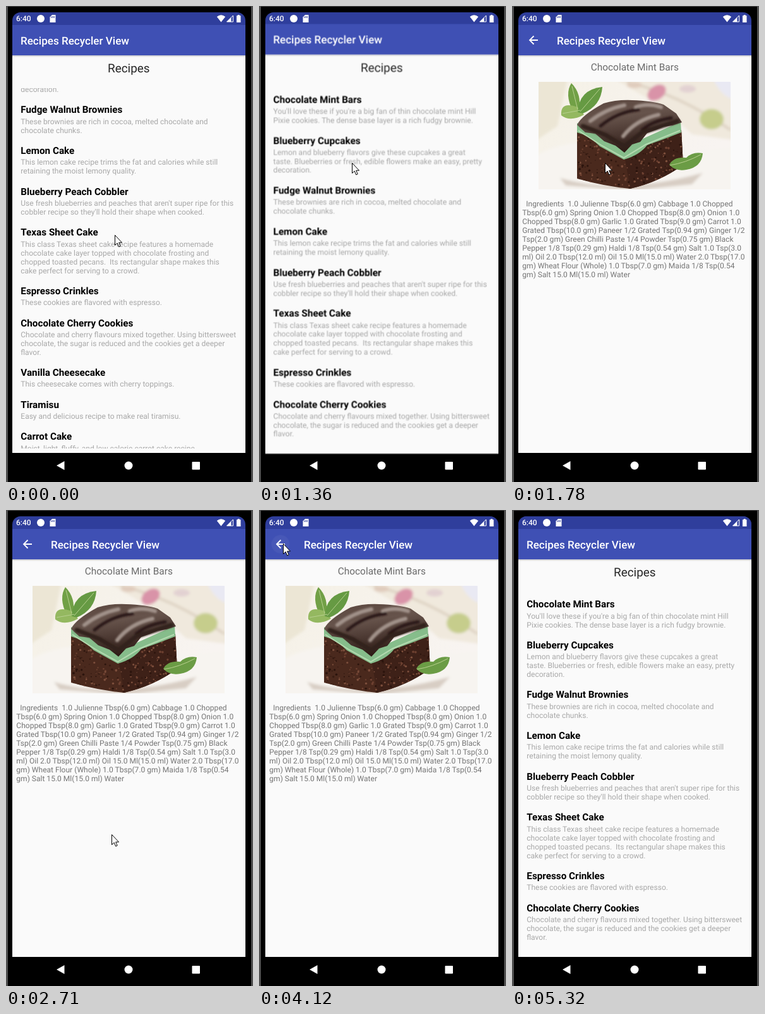
These frames come from a looping animation (391 px wide and 753 px high, 5.63 s). An HTML page:

```html
<!DOCTYPE html>
<html lang="en">
<head>
<meta charset="utf-8">
<title>Recipes</title>
<style>
  html, body { margin: 0; width: 100%; height: 100%; overflow: hidden; background: #000; }
  svg { display: block; width: 391px; height: 753px; }
  text { font-family: Roboto, sans-serif; white-space: pre; text-rendering: geometricPrecision; }
  .bar { font-size: 17.08px; font-weight: 500; fill: #fff; }
  .heading { font-size: 18.9px; fill: #262626; text-anchor: middle; }
  .name { font-size: 15.25px; font-weight: 700; fill: #000; }
  .about { font-size: 12.03px; fill: #a8a8a8; }
  .dish { font-size: 15.45px; fill: #6a6a6a; text-anchor: middle; }
  .ingredients { font-size: 12.06px; fill: #757575; }
  .clock { font-size: 12px; font-weight: 500; fill: #fff; }
</style>
</head>
<body>
<svg id="stage" viewBox="0 0 391 753" xmlns="http://www.w3.org/2000/svg"></svg>
<script>
const LOOP = 5630;
const LINE = 14.03;

const recipes = [
  ['Chocolate Mint Bars', "You'll love these if you're a big fan of thin chocolate mint Hill", 'Pixie cookies. The dense base layer is a rich fudgy brownie.'],
  ['Blueberry Cupcakes', 'Lemon and blueberry flavors give these cupcakes a great', 'taste. Blueberries or fresh, edible flowers make an easy, pretty', 'decoration.'],
  ['Fudge Walnut Brownies', 'These brownies are rich in cocoa, melted chocolate and', 'chocolate chunks.'],
  ['Lemon Cake', 'This lemon cake recipe trims the fat and calories while still', 'retaining the moist lemony quality.'],
  ['Blueberry Peach Cobbler', "Use fresh blueberries and peaches that aren't super ripe for this", "cobbler recipe so they'll hold their shape when cooked."],
  ['Texas Sheet Cake', 'This class Texas sheet cake recipe features a homemade', 'chocolate cake layer topped with chocolate frosting and', 'chopped toasted pecans.  Its rectangular shape makes this', 'cake perfect for serving to a crowd.'],
  ['Espresso Crinkles', 'These cookies are flavored with espresso.'],
  ['Chocolate Cherry Cookies', 'Chocolate and cherry flavours mixed together. Using bittersweet', 'chocolate, the sugar is reduced and the cookies get a deeper', 'flavor.'],
  ['Vanilla Cheesecake', 'This cheesecake comes with cherry toppings.'],
  ['Tiramisu', 'Easy and delicious recipe to make real tiramisu.'],
  ['Carrot Cake', 'Moist, light, fluffy, and low calorie carrot cake recipe.']
];

const ingredients = [
  '  Ingredients  1.0 Julienne Tbsp(6.0 gm) Cabbage 1.0 Chopped',
  'Tbsp(6.0 gm) Spring Onion 1.0 Chopped Tbsp(8.0 gm) Onion 1.0',
  'Chopped Tbsp(8.0 gm) Garlic 1.0 Grated Tbsp(9.0 gm) Carrot 1.0',
  'Grated Tbsp(10.0 gm) Paneer 1/2 Grated Tsp(0.94 gm) Ginger 1/2',
  'Tsp(2.0 gm) Green Chilli Paste 1/4 Powder Tsp(0.75 gm) Black',
  'Pepper 1/8 Tsp(0.29 gm) Haldi 1/8 Tsp(0.54 gm) Salt 1.0 Tsp(3.0',
  'ml) Oil 2.0 Tbsp(12.0 ml) Oil 15.0 Ml(15.0 ml) Water 2.0 Tbsp(17.0',
  'gm) Wheat Flour (Whole) 1.0 Tbsp(7.0 gm) Maida 1/8 Tsp(0.54',
  'gm) Salt 15.0 Ml(15.0 ml) Water'
];

const text = (kind, x, y, s) => `<text class="${kind}" x="${x}" y="${y.toFixed(2)}">${s}</text>`;

function rows() {
  let y = 154.2;
  return recipes.map(([name, ...lines]) => {
    const row = text('name', 23.3, y, name) +
      lines.map((s, i) => text('about', 23.3, y + 17.3 + i * LINE, s)).join('');
    y += 36.55 + lines.length * LINE;
    return row;
  }).join('');
}

const appWindow = (id, titleX, content) => `
  <g id="${id}">
    <rect x="10" y="10" width="369" height="760" fill="#000"/>
    <rect x="10" y="30" width="369" height="677" fill="#fafafa"/>
    <rect x="10" y="78" width="369" height="3" fill="url(#shadow)"/>
    <rect x="10" y="10" width="369" height="20.5" fill="#2f3e9c"/>
    <rect x="10" y="30" width="369" height="48" fill="#3f50b4"/>
    ${text('bar', titleX, 61, 'Recipes Recycler View')}
    ${content}
  </g>`;

const listWindow = id => appWindow(id, 23, `
  ${text('heading', 194.3, 105.2, 'Recipes')}
  <g clip-path="url(#listArea)"><g class="rows">${rows()}</g></g>`);

function crumbs(count) {
  let seed = 7;
  const random = () => (seed = seed * 16807 % 2147483647) / 2147483647;
  const tones = ['#2b140d', '#371c13', '#6d4030', '#7d4f3c'];
  return Array.from({ length: count }, () => {
    const x = 100 + random() * 172, y = 190 + random() * 102;
    return `<circle cx="${x.toFixed(1)}" cy="${y.toFixed(1)}" r="${(0.6 + random() * 1.3).toFixed(1)}" fill="${tones[Math.floor(random() * 4)]}"/>`;
  }).join('');
}

const CAKE = 'M103 194 178 236 268 196 271 251Q235 278 187 289 145 285 103 273Z';

const photo = `
  <g clip-path="url(#photoArea)">
    <rect x="42" y="120" width="304" height="170" fill="url(#table)"/>
    <g filter="url(#soft)">
      <path d="M36 114H88L72 190 36 214Z" fill="#ece6d5"/>
      <path d="M160 114H322L352 150V212L285 203 238 160Z" fill="#f0e9dd"/>
      <path d="M182 120Q265 140 346 196" fill="none" stroke="#ddd2c2" stroke-width="4"/>
      <path d="M318 114H352V148Q330 143 318 114Z" fill="#e9e9f3"/>
      <ellipse cx="229" cy="137" rx="16" ry="11" fill="#d993a8" transform="rotate(-35 229 137)"/>
      <ellipse cx="194" cy="125" rx="12" ry="5" fill="#e0ccbd"/>
      <ellipse cx="278" cy="131" rx="13" ry="6" fill="#e2d1d2"/>
      <ellipse cx="316" cy="179" rx="19" ry="16" fill="#c6cd8c"/>
      <path d="M36 238Q90 205 180 220T352 222V296H36Z" fill="#f7f4f0"/>
      <path d="M76 272Q170 300 302 264L285 282 190 292 85 284Z" fill="#d8cec4"/>
    </g>
    <path d="M96 166Q83 139 94 122 111 139 106 166Z" fill="#71a046"/>
    <path d="M78 173Q76 150 104 160L114 172Q92 184 78 173Z" fill="#94b860"/>
    <path d="M104 168Q106 132 143 128 141 158 112 170Z" fill="#669a43"/>
    <path d="M95 127 104 164M80 170 108 165M139 131 108 167" fill="none" stroke="#b8d090" stroke-width="1"/>
    <path d="${CAKE}" fill="#4a291d"/>
    <path d="M178 236 268 196 271 251Q235 278 187 289Z" fill="#3e2118"/>
    <g clip-path="url(#cakeArea)">${crumbs(420)}</g>
    <path d="M103 185 103 200Q123 205 139 222L177 243Q202 236 214 220 240 211 268 200L267 183 178 223Z" fill="#86bd8b"/>
    <path d="M105 197 141 220 177 240 212 219 266 197" fill="none" stroke="#b4dab0" stroke-width="2"/>
    <path d="M103 188Q110 173 145 154 165 148 190 149 222 150 240 156L260 170 269 184 254 189 240 191 228 196 214 201 203 215 190 219 178 232 164 221 146 214 132 202 116 200Z" fill="url(#frosting)"/>
    <g clip-path="url(#photoArea)" fill="none" stroke-linecap="round" filter="url(#gloss)">
      <path d="M124 182Q148 163 178 157M196 160Q214 153 236 160M176 206Q196 180 232 172" stroke="#a1928a" stroke-width="6"/>
      <path d="M140 190Q166 168 200 164M206 196Q222 182 252 177" stroke="#2a1814" stroke-width="5"/>
      <path d="M112 190 148 204 178 222 206 200 262 182" stroke="#33201a" stroke-width="7"/>
    </g>
    <path d="M249 251Q256 238 276 240 286 230 302 233 300 255 276 259 258 262 249 251Z" fill="#6b9c45"/>
    <path d="M250 252Q275 248 299 235" fill="none" stroke="#b9d08f"/>
  </g>`;

const detailWindow = appWindow('detail', 71, `
  <circle id="ripple" r="18" fill="#fff"/>
  <path d="M41 54H28.500M34.500 47.500 28 54 34.500 60.500" fill="none" stroke="#fff" stroke-width="1.8"/>
  ${text('dish', 194.3, 101.5, 'Chocolate Mint Bars')}
  ${photo}
  ${ingredients.map((s, i) => text('ingredients', 16.3, 316.8 + i * LINE, s)).join('')}`);

document.getElementById('stage').innerHTML = `
  <defs>
    <clipPath id="screen"><rect x="10" y="10" width="369" height="760" rx="13"/></clipPath>
    <clipPath id="listArea"><rect x="10" y="130" width="369" height="570"/></clipPath>
    <clipPath id="photoArea"><rect x="42" y="120" width="304" height="170"/></clipPath>
    <clipPath id="cakeArea"><path d="${CAKE}"/></clipPath>
    <filter id="soft"><feGaussianBlur stdDeviation="2"/></filter>
    <filter id="gloss"><feGaussianBlur stdDeviation="1.6"/></filter>
    <linearGradient id="shadow" x2="0" y2="1">
      <stop stop-color="#c4c4c8"/><stop offset="1" stop-color="#fafafa"/>
    </linearGradient>
    <linearGradient id="table" x2="1" y2=".4">
      <stop stop-color="#f5f1e6"/><stop offset="1" stop-color="#f8f4f1"/>
    </linearGradient>
    <linearGradient id="frosting" x2=".3" y2="1">
      <stop stop-color="#5b473f"/><stop offset=".4" stop-color="#66534b"/><stop offset="1" stop-color="#2f1c17"/>
    </linearGradient>
  </defs>
  <rect width="391" height="753" fill="#000"/>
  <path d="M0 0H391V753H388V1H3V753H0Z" fill="#505050"/>
  <g clip-path="url(#screen)">
    ${listWindow('list')}
    ${detailWindow}
    ${listWindow('listAgain')}
  </g>
  <g fill="#fff">
    ${text('clock', 16, 24.3, '6:40')}
    <circle cx="55" cy="20" r="6"/>
    <path d="M73 14H78.500V26H69.500V17.500Z"/>
    <path d="M71.800 16.500V19M74 16V19M76.200 16V19" stroke="#2f3e9c"/>
    <path d="M340.500 25.500 333.800 17Q340.500 11.500 347.200 17Z"/>
    <path d="M349.500 25 359.500 15V25Z" fill="none" stroke="#fff"/>
    <path d="M349.500 25 356.500 18V25Z"/>
    <path d="M365 15.200H366.800V14H369.600V15.200H371.500V26H365Z"/>
    <path d="M80 727 92.500 720V734Z"/>
    <circle cx="194" cy="727" r="6.500"/>
    <rect x="294.500" y="721" width="12.500" height="12.500" rx="1"/>
  </g>
  <path id="cursor" d="M.5 .5V16.500L4.200 13.100 6.700 19 9.200 17.900 6.700 12.200H11.500Z" fill="#fff" stroke="#000"/>`;

// Each key is [milliseconds, style] and holds until the next one.
function hold(selector, keys) {
  const frames = keys.map(([ms, style]) => ({ offset: ms / LOOP, easing: 'step-end', ...style }));
  frames.push({ ...frames[frames.length - 1], offset: 1 });
  document.querySelector(selector).animate(frames, { duration: LOOP, iterations: Infinity });
}

const move = (x, y) => ({ transform: `translate(${x}px, ${y}px)` });
const zoom = (k, cy, opacity = 1) => ({
  transform: `translate(${195 * (1 - k)}px, ${cy * (1 - k)}px) scale(${k})`, opacity
});
const enter = (k, opacity) => zoom(k, 366, opacity);
const leave = k => zoom(k, 392);
const ripple = (k, opacity) => ({ transform: `translate(34px, 54px) scale(${k})`, opacity });

hold('#list .rows', [[0, move(0, -128)], [120, move(0, -48)], [270, move(0, 0)]]);
hold('#list', [[0, leave(1)], [1360, leave(1.004)], [1510, leave(1.035)], [1630, leave(1.049)], [1780, leave(1)]]);
hold('#detail', [
  [0, enter(1, 0)], [1510, enter(.962)], [1630, enter(.985)], [1780, enter(1)],
  [4510, leave(1.004)], [4630, leave(1.035)], [4750, leave(1.049)], [4900, leave(1)]
]);
hold('#listAgain', [[0, enter(1, 0)], [4630, enter(.962)], [4750, enter(.985)], [4900, enter(1)]]);
hold('#ripple', [
  [0, ripple(.8, 0)], [4120, ripple(.8, .05)], [4240, ripple(1, .08)], [4360, ripple(1, .04)], [4510, ripple(1, 0)]
]);
hold('#cursor', [
  [0, 172, 362], [120, 158, 318], [270, 139, 262], [390, 124, 224], [510, 115, 197],
  [660, 115, 162], [810, 115, 155], [930, 115, 149], [1240, 131, 198], [1360, 147, 248],
  [1930, 147, 262], [2080, 145, 267], [2200, 142, 271], [2320, 139, 267],
  [2470, 150, 345], [2590, 161, 450], [2710, 167, 513], [2860, 142, 372], [2980, 118, 234],
  [3130, 103, 164], [3280, 84, 120], [3430, 62, 87], [3580, 52, 71], [3700, 45, 61],
  [3820, 40, 55], [3970, 38, 53], [4360, 50, 101], [4510, 90, 220], [4630, 132, 342],
  [4750, 180, 540], [4900, 228, 740], [5050, -40, -40], [5200, 39, 637], [5320, -40, -40]
].map(([ms, x, y]) => [ms, move(x, y)]));
</script>
</body>
</html>
```
